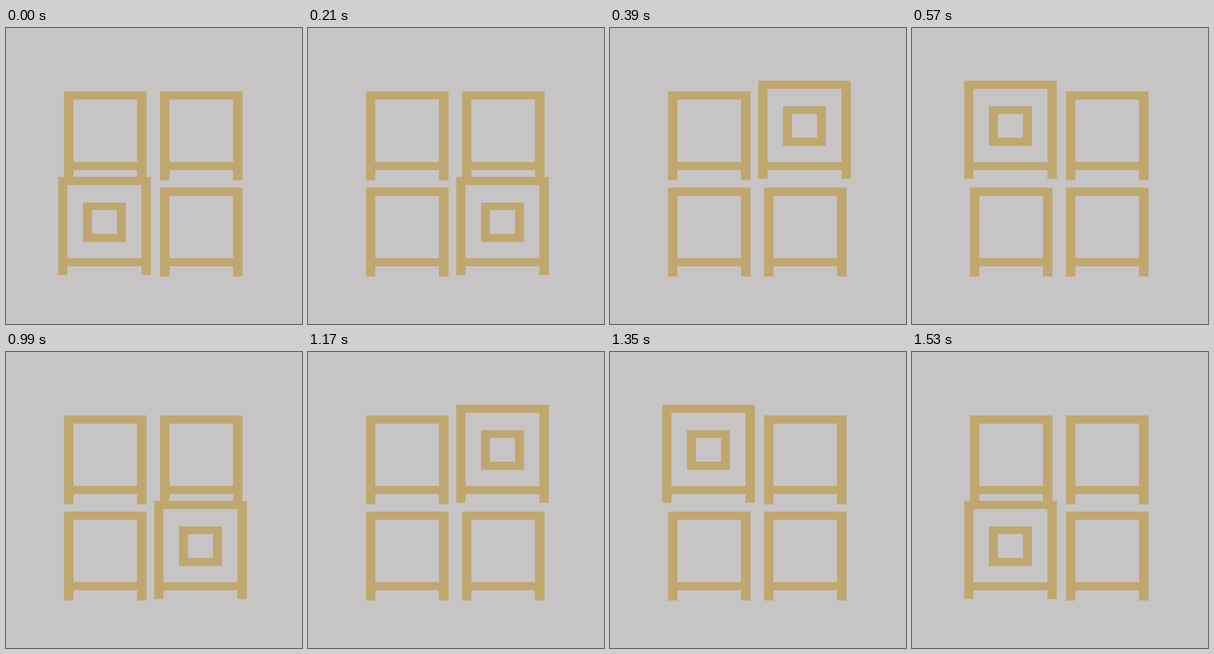
An HTML page for the animation above (1.59 s loop, 400 by 400 pixels).

```html
<!DOCTYPE html>
<html lang="en">
<head>
<meta charset="utf-8">
<title>Four stools</title>
<style>
  html, body { margin: 0; height: 100%; overflow: hidden; background: #c6c4c5; }
  svg { display: block; width: 100vw; height: 100vh; }
  .stools { fill: #c0a76e; fill-rule: evenodd; filter: blur(0.6px); }
</style>
</head>
<body>
<svg viewBox="0 0 400 400">
  <defs>
    <path id="small" d="M8.3 15.7H119.8V135.7H107V122H21V135.7H8.3Z M21 26.7H107V111H21Z"/>
    <path id="large" d="M.5 1.3H125.7V133.7H113V122H13V133.7H.5Z M13 12.2H113V111.3H13Z
      M34 35.7H92V89.2H34Z M46 46H80V78.3H46Z"/>
  </defs>
  <g class="stools"></g>
</svg>
<script>
  const LOOP = 1590;
  const CHANGES = [210, 390, 570, 750, 990, 1170, 1350, 1530];
  // Counter-clockwise from the bottom left
  const CELLS = [[70, 200], [199.8, 200], [199.8, 70], [70, 70]];

  const group = document.querySelector('.stools');
  const stools = CELLS.map(([x, y]) => {
    const stool = document.createElementNS('http://www.w3.org/2000/svg', 'use');
    stool.setAttribute('transform', `translate(${x} ${y})`);
    return group.appendChild(stool);
  });

  function draw(now) {
    const time = now % LOOP;
    const active = CHANGES.filter(change => time >= change).length % CELLS.length;
    stools.forEach((stool, i) =>
      stool.setAttribute('href', i === active ? '#large' : '#small'));
  }

  const start = performance.now();
  function tick() {
    draw(performance.now() - start);
    requestAnimationFrame(tick);
  }
  tick();
</script>
</body>
</html>
```
